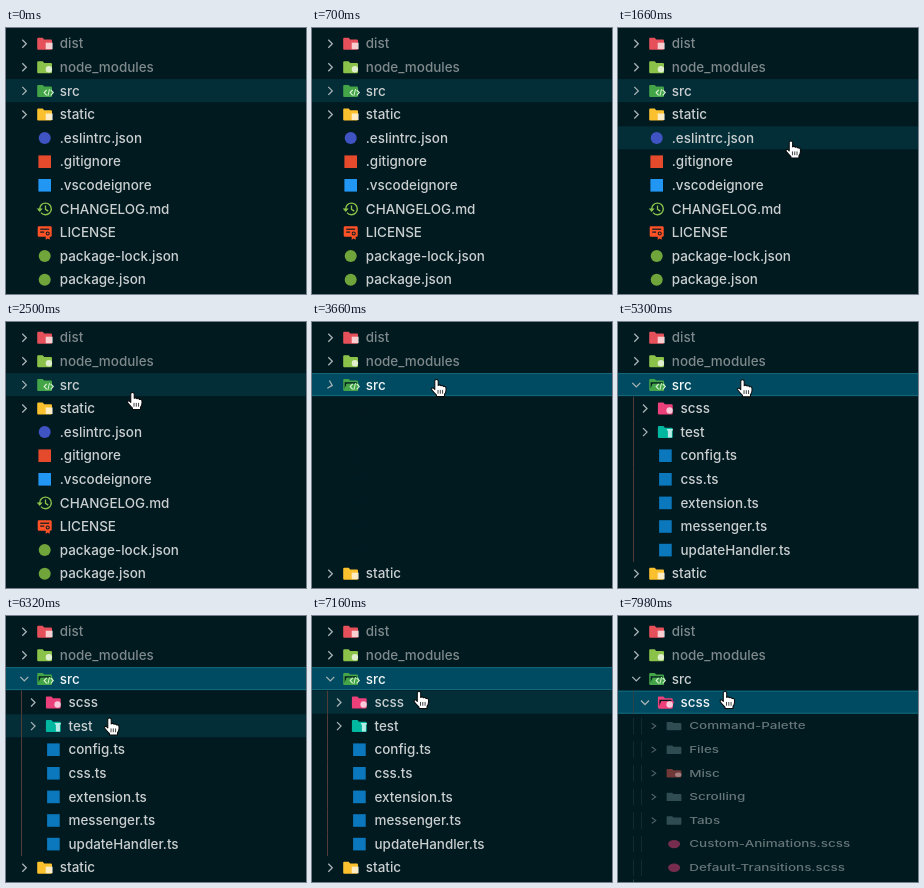
Recreate the animation shown at these times as an HTML page with a canvas. Size 300 by 266 pixels, loop 8 s.

```html
<!DOCTYPE html>
<html lang="en">
<head>
<meta charset="utf-8">
<title>File tree</title>
<style>
  html, body { margin: 0; width: 100%; height: 100%; overflow: hidden; background: #001a20; }
  canvas { display: block; width: 300px; height: 266px; }
</style>
</head>
<body>
<canvas id="stage"></canvas>
<script>
const W = 300, H = 266, LOOP = 8000;
const ROW = 23.6, TOP = 3.9, INDENT = 8.7;
const OPEN_SRC = 3620, OPEN_SCSS = 7480, REVEAL = 1000;
const COLORS = {
  bg: '#001a20', hover: '#032d37', selected: '#004b61', focus: '#14697b',
  text: '#cbcfd0', dim: '#7f898b', chevron: '#a9b3b5',
  guide: '#533b39', faintGuide: '#2a4448', badge: 'rgba(255, 255, 255, .72)'
};

const canvas = document.getElementById('stage');
const ratio = window.devicePixelRatio || 1;
canvas.width = W * ratio;
canvas.height = H * ratio;
const ctx = canvas.getContext('2d');

const folder = (name, color, badge, extra) => ({ name, color, badge, folder: true, ...extra });
const file = (name, icon, color) => ({ name, icon, color });

const SCSS = [
  folder('Command-Palette', '#607d86'),
  folder('Files', '#607d86'),
  folder('Misc', '#e0574f', 'dot'),
  folder('Scrolling', '#607d86'),
  folder('Tabs', '#607d86'),
  file('Custom-Animations.scss', 'disc', '#ec407a'),
  file('Default-Transitions.scss', 'disc', '#ec407a')
];
const SRC = [
  folder('scss', '#ec407a', 'dot', { opensAt: OPEN_SCSS, children: SCSS }),
  folder('test', '#00b8a0', 'tube'),
  ...['config', 'css', 'extension', 'messenger', 'updateHandler']
    .map(name => file(name + '.ts', 'square', '#0b78bd'))
];
const ROOT = [
  folder('dist', '#e5505a', 'box', { dim: true }),
  folder('node_modules', '#8bc34a', 'dot', { dim: true }),
  folder('src', '#43a547', 'code', { opensAt: OPEN_SRC, children: SRC }),
  folder('static', '#fbc02d', 'box'),
  file('.eslintrc.json', 'disc', '#4053c2'),
  file('.gitignore', 'square', '#e64a2c'),
  file('.vscodeignore', 'square', '#2196f3'),
  file('CHANGELOG.md', 'history', '#8bc34a'),
  file('LICENSE', 'certificate', '#ff5226'),
  file('package-lock.json', 'disc', '#6fa53a'),
  file('package.json', 'disc', '#6fa53a')
];

// Fingertip path: time, x, y
const POINTER = [
  [1260, 236, 230], [1660, 173, 113], [1980, 152, 102], [2160, 142, 96],
  [2500, 126.5, 70.5], [2820, 124.5, 57.5], [5300, 124.5, 57.5], [5620, 124, 140],
  [5900, 114, 220], [6040, 110, 218], [6140, 107, 198], [6320, 103.5, 102],
  [6420, 103.5, 101], [6620, 105, 83], [6880, 107, 75.5]
];

const clamp = v => Math.max(0, Math.min(1, v));
const smooth = v => { v = clamp(v); return v * v * (3 - 2 * v); };
const mix = (a, b, k) => a + (b - a) * k;

function pointerAt(t) {
  if (t < POINTER[0][0]) return null;
  const next = POINTER.findIndex(p => p[0] > t);
  if (next < 0) return POINTER[POINTER.length - 1].slice(1);
  const [t0, x0, y0] = POINTER[next - 1], [t1, x1, y1] = POINTER[next];
  const k = (t - t0) / (t1 - t0);
  return [mix(x0, x1, k), mix(y0, y1, k)];
}

function listRows(items, t, depth = 0, shown = 1, rows = []) {
  for (const item of items) {
    const open = item.opensAt !== undefined && t >= item.opensAt;
    rows.push({ item, depth, shown, open });
    if (open) listRows(item.children, t, depth + 1, smooth((t - item.opensAt) / REVEAL), rows);
  }
  return rows;
}

function line(points, color, width = 1) {
  ctx.beginPath();
  points.forEach(([x, y]) => ctx.lineTo(x, y));
  ctx.strokeStyle = color;
  ctx.lineWidth = width;
  ctx.stroke();
}

function fillShape(path, color) {
  ctx.fillStyle = color;
  ctx.fill(new Path2D(path));
}

function disc(x, y, r, color) {
  ctx.beginPath();
  ctx.arc(x, y, r, 0, Math.PI * 2);
  ctx.fillStyle = color;
  ctx.fill();
}

const badges = {
  dot() { disc(4.2, 2, 3.2, COLORS.badge); },
  box() { fillShape('M1-1H8V5.5H1Z', COLORS.badge); },
  tube() { fillShape('M1.5-3H7.5V-1.5H6.5V5.5H2.5V-1.5H1.5Z', COLORS.badge); },
  code() {
    line([[2, -1], [-.5, 1.7], [2, 4.4]], '#d5f3d2', 1.2);
    line([[6, -1], [8.5, 1.7], [6, 4.4]], '#d5f3d2', 1.2);
    line([[4.8, -1.8], [3.2, 5]], '#d5f3d2');
  }
};

function folderIcon(item, open) {
  fillShape('M-7.5-5Q-7.5-6-6.5-6H-2L-.5-4.3H6.2Q7.3-4.3 7.3-3.2V5Q7.3 6 6.2 6H-6.4Q-7.5 6-7.5 5Z', item.color);
  if (open) {
    fillShape('M-6-2.7H6V-1.2H-4.2L-6 3.5Z', COLORS.bg);
    fillShape('M-4-1.2H8.5L6.8 6H-6.5Z', item.color);
  }
  if (item.badge) badges[item.badge]();
}

const icons = {
  disc(color) { disc(0, 0, 6, color); },
  square(color) {
    ctx.fillStyle = color;
    ctx.fillRect(-6.3, -6.3, 12.6, 12.6);
  },
  history(color) {
    ctx.beginPath();
    ctx.arc(.8, 0, 5.8, Math.PI, Math.PI * 2.78);
    ctx.strokeStyle = color;
    ctx.lineWidth = 1.4;
    ctx.stroke();
    fillShape('M-8-.5H-2L-5 3Z', color);
    line([[.8, -3.3], [.8, .5], [3.6, 2.2]], color, 1.3);
  },
  certificate(color) {
    fillShape('M-7-5Q-7-6.3-5.7-6.3H5.7Q7-6.3 7-5V3Q7 4.2 5.8 4.2H5V7.2L3 6L1 7.2V4.2H-5.7Q-7 4.2-7 3Z', color);
    line([[-4.5, -3.3], [4.5, -3.3]], COLORS.bg, 1.2);
    line([[-4.5, -.4], [-.5, -.4]], COLORS.bg, 1.2);
    disc(3, 1, 2, COLORS.bg);
    disc(3, 1, 1.1, color);
  }
};

function chevron(x, open, age, color) {
  ctx.save();
  ctx.translate(x, 0);
  if (open) ctx.rotate(Math.PI / 2 * smooth(age / 160));
  line([[-2, -4], [2, 0], [-2, 4]], color, 1.3);
  ctx.restore();
}

function drawRow(row, y, t, selected, guideColor) {
  const { item, depth, shown, open } = row;
  const dx = depth * INDENT;
  ctx.save();
  ctx.globalAlpha = shown;
  ctx.translate(0, y + ROW / 2);
  ctx.scale(1, mix(.4, 1, shown));
  for (let level = 0; level < depth; level++) {
    const x = Math.floor(15 + level * INDENT) + .5;
    line([[x, -ROW / 2], [x, ROW / 2]], guideColor);
  }
  if (item.folder) chevron(18.3 + dx, open, t - item.opensAt, COLORS.chevron);
  ctx.save();
  ctx.translate(38.7 + dx, 0);
  if (item.folder) folderIcon(item, open);
  else icons[item.icon](item.color);
  ctx.restore();
  ctx.fillStyle = selected ? '#f2f6f7' : item.dim ? COLORS.dim : COLORS.text;
  ctx.fillText(item.name, 53.8 + dx, 4.6);
  ctx.restore();
}

function drawHand([x, y]) {
  ctx.save();
  ctx.translate(x, y);
  ctx.scale(.95, .95);
  const hand = new Path2D('M-1.8 1.8Q-1.8 0 0 0Q1.8 0 1.8 1.8V6.2Q3.5 5 4.7 6.6Q6.5 5.7 7.4 7.4Q9.9 6.8 10 9.2V11.5Q9.8 13.8 8.4 15.6V18H0V16.4Q-2.4 14-5 10.8Q-5.6 8.3-3.2 9L-1.8 10.4Z');
  ctx.fillStyle = '#fff';
  ctx.fill(hand);
  ctx.strokeStyle = '#0b0b0b';
  ctx.lineWidth = 1.1;
  ctx.lineJoin = 'round';
  ctx.stroke(hand);
  [1.6, 4, 6.4].forEach(px => line([[px, 11], [px, 15]], '#222', .9));
  ctx.restore();
}

function draw(t) {
  ctx.setTransform(ratio, 0, 0, ratio, 0, 0);
  ctx.fillStyle = COLORS.bg;
  ctx.fillRect(0, 0, W, H);
  ctx.font = '500 13.45px Inter, "Open Sans", sans-serif';

  const rows = listRows(ROOT, t);
  const pointer = pointerAt(t);
  const hovered = pointer ? Math.floor((pointer[1] - TOP) / ROW) : -1;
  const selected = t >= OPEN_SCSS ? 3 : 2;
  const focused = t >= OPEN_SRC;
  const guideColor = t >= OPEN_SCSS ? COLORS.faintGuide : COLORS.guide;

  rows.forEach((row, i) => {
    const y = TOP + i * ROW;
    if (y > H) return;
    const active = i === selected && focused;
    if (i === selected || i === hovered) {
      ctx.fillStyle = active ? COLORS.selected : COLORS.hover;
      ctx.fillRect(0, y, W, ROW - .6);
    }
    if (active) {
      [y + .5, y + ROW - 1.1].forEach(edge => line([[0, edge], [W, edge]], COLORS.focus));
    }
    drawRow(row, y, t, active, guideColor);
  });

  if (pointer) drawHand(pointer);
}

function tick() {
  draw(performance.now() % LOOP);
  requestAnimationFrame(tick);
}
tick();
</script>
</body>
</html>
```
